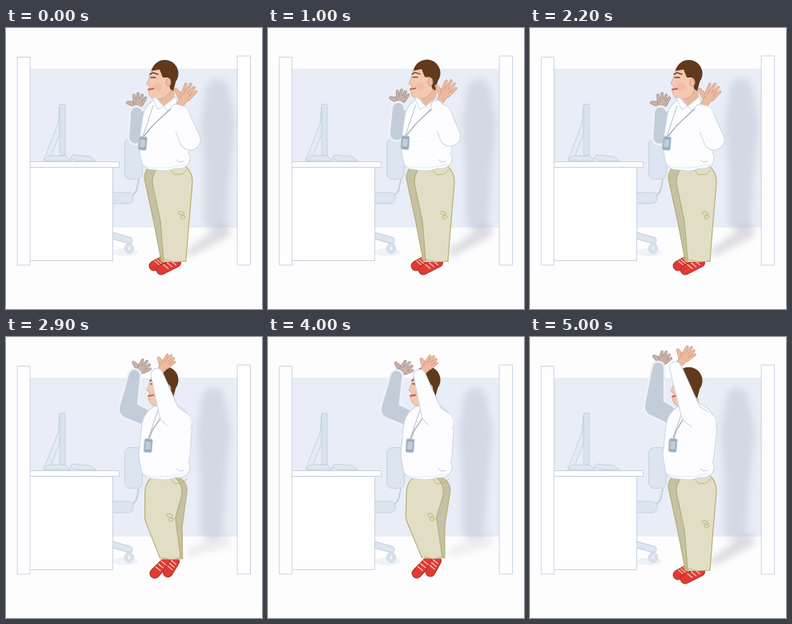
An HTML page with a canvas that plays this animation: 320 by 352 pixels, repeating every 5100 ms.

```html
<!DOCTYPE html>
<html lang="en">
<head>
<meta charset="utf-8">
<title>Office stretch</title>
<style>
  html, body { margin: 0; width: 100%; height: 100%; overflow: hidden; background: #fefdfe; }
  canvas { display: block; width: 320px; height: 352px; }
</style>
</head>
<body>
<canvas id="stage" width="320" height="352"></canvas>
<script>
const ctx = document.getElementById('stage').getContext('2d');
const LOOP = 5100, STEP = 100, CYCLE = 1090, TAU = Math.PI * 2;
const LINE = '#c3d0de', SHIRT = '#fdfdff', SHIRT_EDGE = '#cad5e2', SHADE = '#c3ccd9';
const KHAKI = '#e2dec6', KHAKI_EDGE = '#b8b074', KHAKI_DARK = '#c4c1a6';
const SKIN = '#f4c9b2', SKIN_EDGE = '#cf9a80', HAIR = '#613a1c';

const clamp = (v, a = 0, b = 1) => Math.max(a, Math.min(b, v));
const lerp = (a, b, f) => a + (b - a) * f;
const smooth = v => (v = clamp(v), v * v * (3 - 2 * v));

// Blends evenly spaced key poses; p = 1 is the second pose.
function at(p, ...keys) {
  const i = clamp(Math.floor(p), 0, keys.length - 2);
  return keys[i].map((v, n) => lerp(v, keys[i + 1][n], p - i));
}

function paint(fill, stroke, width = 0.9) {
  if (fill) { ctx.fillStyle = fill; ctx.fill(); }
  if (stroke) { ctx.strokeStyle = stroke; ctx.lineWidth = width; ctx.stroke(); }
}

function poly(points, fill, stroke, width) {
  ctx.beginPath();
  points.forEach(p => ctx.lineTo(...p));
  if (fill) ctx.closePath();
  paint(fill, stroke, width);
}
const line = (points, stroke, width) => poly(points, null, stroke, width);

function box(x, y, w, h, fill, radius = 0) {
  ctx.beginPath();
  ctx.roundRect(x, y, w, h, radius);
  paint(fill, LINE);
}

function oval(x, y, rx, ry, fill, stroke, turn = 0) {
  ctx.beginPath();
  ctx.ellipse(x, y, rx, ry, turn, 0, TAU);
  paint(fill, stroke);
}

// A soft tube through circles [x, y, radius], with an outline around the union.
function tube(joints, fill, edge, width = 1) {
  const passes = edge ? [[edge, width / 2], [fill, -width / 2]] : [[fill, 0]];
  for (const [color, grow] of passes) {
    ctx.beginPath();
    joints.forEach(([x, y, radius], i) => {
      const r = radius + grow;
      ctx.moveTo(x + r, y);
      ctx.arc(x, y, r, 0, TAU);
      if (!i) return;
      const [px, py, pr] = joints[i - 1], q = pr + grow;
      const dir = Math.atan2(y - py, x - px);
      const side = Math.acos(clamp((q - r) / Math.hypot(x - px, y - py), -1, 1));
      const rim = (cx, cy, cr, a) => [cx + cr * Math.cos(a), cy + cr * Math.sin(a)];
      ctx.moveTo(...rim(px, py, q, dir - side));
      ctx.lineTo(...rim(x, y, r, dir - side));
      ctx.lineTo(...rim(x, y, r, dir + side));
      ctx.lineTo(...rim(px, py, q, dir + side));
      ctx.closePath();
    });
    paint(color);
  }
}

function drawShadow(reach, hop) {
  const shift = -5 * clamp(reach);
  ctx.save();
  ctx.beginPath();
  ctx.rect(141, 51, 148, 250);
  ctx.clip();
  ctx.filter = 'blur(4px)';
  tube([[264 + shift, 78, 14], [265 + shift, 120, 21], [264 + shift, 175, 16], [262 + shift, 240, 14]],
    'rgba(184,190,205,.43)');
  tube([[230, 281 - hop * 12, 5], [272, 255, 9]], `rgba(165,165,175,${0.36 - hop * 0.18})`);
  ctx.restore();
}

function drawChair() {
  const fill = '#dce5f0';
  oval(149, 281, 16, 5, '#eff2f7');
  box(148.5, 138.5, 22, 51, fill, 7);
  line([[166, 190], [163, 204], [157, 211]], LINE, 2);
  box(128, 206, 31, 14, fill, 6);
  tube([[133, 260, 4], [154, 266, 4]], fill, LINE);
  oval(154, 276, 5.5, 6.5, fill, LINE);
  oval(154, 276, 2.5, 3.5, '#eef2f7', LINE);
}

function drawOffice(reach, hop) {
  ctx.fillStyle = '#fefdfe';
  ctx.fillRect(0, 0, 320, 352);
  ctx.fillStyle = '#e8edf7';
  ctx.fillRect(30, 51, 259, 199);
  drawShadow(reach, hop);
  drawChair();
  poly([[67, 98], [65, 120], [47, 166], [54, 166], [67, 133]], '#e4eaf3', LINE);
  poly([[47, 166], [53, 160], [74, 160], [81, 166]], '#dfe7f0', LINE);
  box(67.5, 95.5, 6.5, 64, '#d9e3ed');
  poly([[80, 163], [83, 159], [105, 161], [113, 167], [86, 166]], '#dfe7f0', LINE);
  box(29.5, 174.5, 104, 117, '#fefeff');
  box(29.5, 167.5, 112, 7, '#fefeff');
  box(14.5, 36.5, 15.5, 260.5, '#fefeff');
  box(289.5, 35, 16, 262, '#fefeff');
}

function drawHand([wx, wy], [tx, ty], spread, fill, edge) {
  const size = Math.hypot(tx - wx, ty - wy), dir = Math.atan2(ty - wy, tx - wx);
  const joint = (reach, turn, r) =>
    [wx + Math.cos(dir + turn) * size * reach, wy + Math.sin(dir + turn) * size * reach, r];
  const palm = joint(0.4, 0, 4.5);
  tube([palm, joint(0.68, -2.2 * spread, 1.6)], fill, edge, 0.7);
  for (let i = 0; i < 4; i++) {
    const turn = (i - 1.5) * spread * 0.55;
    tube([joint(0.5, turn, 2), joint(1 - Math.abs(i - 1.3) * 0.07, turn, 1.4)], fill, edge, 0.7);
  }
  tube([[wx, wy, 4], palm], fill, edge, 0.7);
  tube([palm, joint(0.58, 0, 3)], fill);
}

function drawShoe(heel, toe) {
  tube([[...heel, 5.5], [...toe, 6]], '#e23a32', '#a5352d');
  for (let i = 0; i < 3; i++) {
    const [x, y] = at(0.2 + i * 0.25, heel, toe);
    line([[x - 3, y - 4], [x + 3, y + 1]], '#f7cdc4', 1.2);
  }
}

function drawLegs(hop) {
  const mix = (ground, air) => at(hop, ground, air);
  drawShoe(mix([197, 291], [200, 281]), mix([185, 298], [186, 296]));
  drawShoe(mix([213, 294], [211, 280]), mix([194, 303], [203, 294]));
  const cuff = 293 - hop * 16;
  ctx.save();
  ctx.beginPath();
  ctx.rect(150, 172, 100, cuff - 172);
  ctx.clip();
  tube([mix([189, 187, 16], [211, 192, 17]), mix([197, 238, 13], [209, 236, 12]),
    mix([205, 290, 11], [212, 278, 9])], KHAKI_DARK, KHAKI_EDGE, 1.2);
  tube([mix([208, 192, 25], [196, 194, 23]), mix([211, 240, 18], [191, 224, 19]),
    mix([211, 290, 14], [206, 278, 12])], KHAKI, KHAKI_EDGE, 1.2);
  ctx.restore();
  line([mix([194, 289], [195, 275]), mix([210, 293], [207, 278]), mix([225, 292], [220, 274])], KHAKI_EDGE);
  const [x, y] = mix([219, 234], [203, 225]);
  oval(x, y - 2, 4, 2, null, KHAKI_EDGE, 0.3);
  oval(x + 2, y + 3, 3, 2, null, KHAKI_EDGE, -0.3);
  line([[206, 178], [211, 184], [220, 183], [226, 178]], KHAKI_EDGE);
}

function drawHead(reach) {
  const [lift] = at(reach, [0], [-4], [-2]), raised = clamp(reach - 1);
  ctx.save();
  ctx.translate(196, 66 + lift);
  tube([[5, 16, 10], [4, 23, 9]], '#ebb99f');
  ctx.beginPath();
  ctx.moveTo(-13, -16);
  ctx.quadraticCurveTo(-16, -9, -17, -3);
  ctx.lineTo(-20, 4);
  ctx.lineTo(-16, 7);
  ctx.lineTo(-18, 12);
  ctx.quadraticCurveTo(-17, 21, -11, 23);
  ctx.quadraticCurveTo(4, 26, 11, 10);
  ctx.lineTo(10, -18);
  ctx.closePath();
  paint(SKIN, SKIN_EDGE, 0.7);
  oval(-7, 8, 6, 5, 'rgba(236,140,120,.2)');
  line([[-16, -8], [-12, -10], [-6, -8]], '#74452f', 1.4);
  line([[-15, -4], [-9, -4]], '#5d4638', 1.3);
  line([[-18, 11], [-12, 10]], '#d4544c', 1.8);
  ctx.beginPath();
  ctx.ellipse(2.5, -9, 17, 17, 0, Math.PI * 1.06, TAU * 1.1);
  ctx.lineTo(13, 13);
  ctx.lineTo(9, 10);
  ctx.lineTo(lerp(7, 2, raised), lerp(-4, 8, raised));
  ctx.lineTo(0, -4);
  ctx.lineTo(-4, -14);
  ctx.closePath();
  paint(HAIR);
  if (raised < 0.5) oval(7, 2, 3, 5, '#f0bda3', SKIN_EDGE);
  ctx.restore();
}

function drawCollar(reach) {
  ctx.save();
  ctx.globalAlpha = clamp(1.6 - reach);
  poly([[183, 88], [187, 87], [197, 98], [190, 102]], SHIRT, SHIRT_EDGE);
  poly([[197, 98], [212, 86], [214, 93], [203, 104]], SHIRT, SHIRT_EDGE);
  ctx.restore();
}

function drawLanyard(reach) {
  const left = at(reach, [184, 97], [189, 92], [191, 92]);
  const right = at(reach, [207, 100], [195, 100], [192, 102]);
  const [x, y] = at(reach, [172, 136], [178, 128], [180, 127]);
  line([left, [x - 1, y]], '#b7c0ca', 1);
  line([right, [lerp(right[0], x, 0.6) - 2, lerp(right[1], y, 0.6)], [x, y]], '#9aa7b5', 1.2);
  ctx.save();
  ctx.translate(x - 1, y);
  ctx.rotate(0.08);
  box(-4.5, 0, 10, 17, '#98abbd', 2);
  box(-2, 4, 5, 9, '#c1ced9');
  ctx.restore();
}

function drawMan(reach, hop) {
  const pose = (rest, brow, high) => at(reach, rest, brow, high);
  const farWrist = pose([163, 106], [161, 57], [160, 36]);
  drawHand(farWrist, pose([168, 82], [184, 44], [171, 16]), 0.42, '#c9b3a8', '#a08b82');
  tube([pose([172, 112, 9], [173, 103, 10], [173, 96, 12]), pose([162, 137, 9], [150, 94, 11], [156, 86, 13]),
    [...farWrist, 8]], SHADE, '#eef2f8', 2.5);

  drawLegs(hop);
  tube([pose([197, 98, 14], [200, 95, 15], [201, 94, 15]), pose([198, 114, 27], [200, 114, 31], [202, 114, 32]),
    [198, 147, 32], [181, 165, 12], [217, 163, 13]], SHIRT, SHIRT_EDGE);
  line([[171, 172], [181, 175], [203, 175], [224, 171]], '#dfe6ef');
  drawHead(reach);
  drawCollar(reach);
  drawLanyard(reach);

  const wrist = pose([213, 103], [195, 55], [180, 36]);
  drawHand(wrist, pose([234, 71], [213, 34], [203, 11]), 0.28, '#eebb9f', SKIN_EDGE);
  const shoulder = pose([217, 109, 12], [217, 107, 14], [219, 108, 14]);
  const elbow = pose([230, 140, 13], [207, 96, 13], [201, 96, 13]);
  tube([shoulder, elbow, [...wrist, 7.5]], SHIRT, SHIRT_EDGE);
  tube([shoulder, [shoulder[0] - 4, shoulder[1] + 8, 13]], SHIRT);
  line([[213, 165], [217, 168], [222, 167]], '#b9c7d6');
}

function frame(now) {
  const time = Math.floor(now % LOOP / STEP) * STEP;
  const angle = time / CYCLE * TAU, swing = -Math.cos(angle);
  // The arms linger at the brow on their way up and down.
  const reach = clamp(1 + 1.1 * swing * Math.sqrt(Math.abs(swing)), 0, 2);
  const hop = smooth((Math.sin(angle) ** 2 - 0.3) / 0.5);
  drawOffice(reach, hop);
  drawMan(reach, hop);
  requestAnimationFrame(frame);
}
ctx.lineCap = ctx.lineJoin = 'round';
requestAnimationFrame(frame);
</script>
</body>
</html>
```
